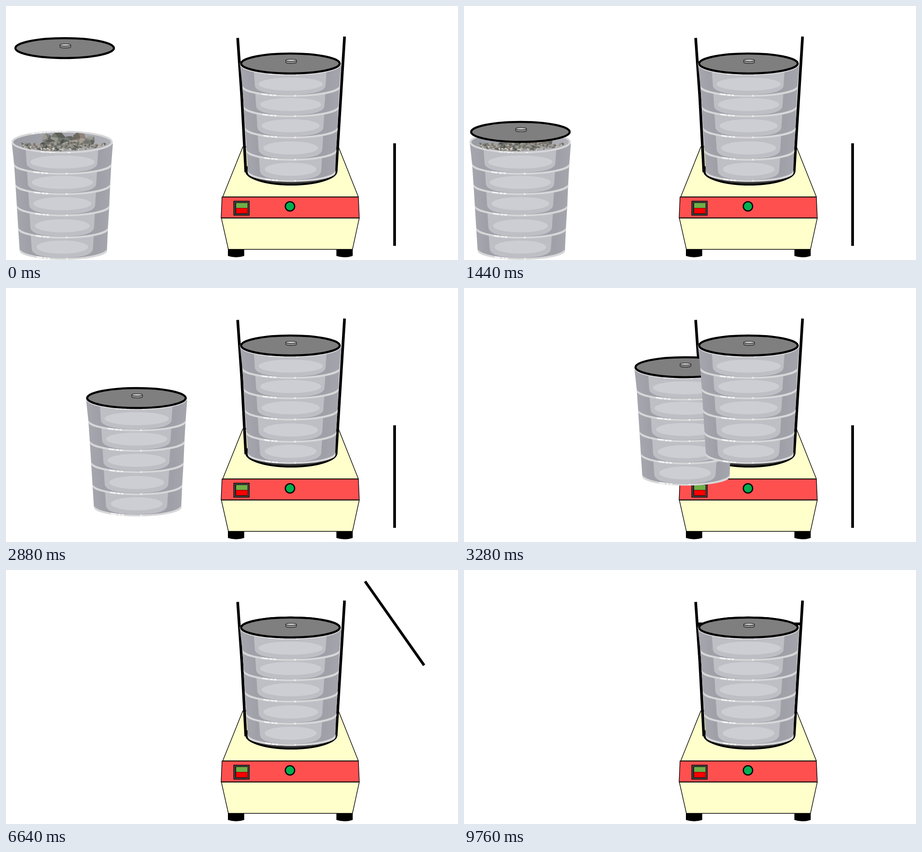
Write an HTML page that moves like this. It is 998 px wide and 561 px high and loops after 9800 ms.

```html
<!DOCTYPE html>
<html lang="en">
<head>
<meta charset="utf-8">
<title>Sieve shaker</title>
<style>
  html, body { margin: 0; width: 100%; height: 100%; overflow: hidden; background: #fff; }
  svg { display: block; width: 998px; height: 561px; }
</style>
</head>
<body>
<svg viewBox="0 0 998 561" xmlns="http://www.w3.org/2000/svg">
  <defs>
    <linearGradient id="steel">
      <stop offset="0" stop-color="#a6a7ae"/>
      <stop offset=".12" stop-color="#9fa0a8"/>
      <stop offset=".88" stop-color="#9fa0a8"/>
      <stop offset="1" stop-color="#a5a6ad"/>
    </linearGradient>
    <linearGradient id="hollow">
      <stop offset="0" stop-color="#9a9ca3"/>
      <stop offset="1" stop-color="#b0b1b7"/>
    </linearGradient>
    <clipPath id="opening"><ellipse cx="628" cy="128.5" rx="108" ry="21.5"/></clipPath>
    <g id="stack"></g>
    <g id="lid">
      <ellipse rx="108.800" ry="22" fill="#7f7f7f" stroke="#000" stroke-width="4.500"/>
      <g stroke="#1c1c1c" stroke-width="1.100">
        <path d="M-10.500-7V-2.500A12 2.400 0 0 0 13.500-2.500V-7" fill="#8c8c8c"/>
        <ellipse cx="1.500" cy="-7" rx="12" ry="2.500" fill="#c4c4c4"/>
      </g>
    </g>
  </defs>

  <g stroke="#000" stroke-width="1.400">
    <path d="M490 537h36v15q-18 6-36 0zM729.500 537h36v15q-18 6-36 0z" stroke="none"/>
    <path d="M523 311H734L778 421.500H478.500Z" fill="#ffc"/>
    <path d="M477 422H778L780 468H475Z" fill="#ff5050"/>
    <path d="M475.500 468.500H780L765 537.500H491Z" fill="#ffc"/>
    <rect x="503" y="431" width="34" height="31" fill="#484848"/>
    <rect x="506.500" y="434" width="27" height="25" fill="#000" stroke="none"/>
    <rect x="508" y="435" width="25" height="11" fill="#70ad47" stroke="none"/>
    <rect x="508" y="446.500" width="25" height="11.500" fill="#f00" stroke="none"/>
    <circle cx="627" cy="442.500" r="10.300" fill="#00b050" stroke-width="2.600"/>
    <ellipse cx="630" cy="364" rx="100" ry="30.500" fill="#3a3a3a" stroke-width="4"/>
  </g>
  <path d="M511.500 70.500L520.500 200L529.500 367M747.500 67.500L729 364" fill="none" stroke="#000" stroke-width="6"/>

  <path id="rod" d="M0-113.300V113.300" stroke="#000" stroke-width="6"/>
  <g id="load">
    <use href="#stack"/>
    <g id="stones" clip-path="url(#opening)"></g>
  </g>
  <use id="cover" href="#lid"/>
  <use href="#stack"/>
  <use href="#lid" x="628" y="127"/>
</svg>
<script>
const $ = id => document.getElementById(id);
const LOOP = 9800, STEP = 40;

// Ring borders from top to bottom: [left, right, y]
const rims = [[517, 740, 132], [522, 736.5, 178], [525, 734, 223], [528, 732, 270], [531, 729, 319], [534, 727, 366]];

function ring(i) {
  const [l0, r0, y0] = rims[i], [l, r, y] = rims[i + 1];
  const rx = (r - l) / 2;
  const arc = `${l} ${y}A${rx} 21 0 0 0 ${r} ${y - 1}`;
  const a = 546.5 + i * 2.8, b = 708.5 - i * 2.4;
  return `<path d="M${l0} ${y0}L${arc}L${r0} ${y0}Z" fill="url(#steel)"/>
    <path d="M${a} ${y0}L${a + 3} ${y - 2}C${a + 4} ${y + 12} 585 ${y + 18} 628 ${y + 18}
      S${b - 4} ${y + 12} ${b - 3} ${y - 2}L${b} ${y0}Z" fill="#bebfc5"/>
    <ellipse cx="628.500" cy="${y - 5.5}" rx="${71 - i * 3.5}" ry="14.500" fill="#cdced3"/>
    <path d="M${l - 0.5} ${y - 3}A${rx} 22 0 0 0 ${r + 0.5} ${y - 4}V${y + 2}A${rx} 20 0 0 1 ${l} ${y + 3}Z"
      fill="#d7d7d9"/>
    <path d="M${arc}" fill="none" stroke="#f5f5f6" stroke-width="3.200" pathLength="100"
      stroke-dasharray="0 21 6 1.5 3 1 2.5 18 1.5 100"/>`;
}

$('stack').innerHTML = [4, 3, 2, 1, 0].map(ring).join('') +
  `<ellipse cx="628" cy="128.500" rx="109.800" ry="23" fill="url(#hollow)" stroke="#d7d7d9" stroke-width="4"/>
   <path d="M581 150A109.800 23 0 0 0 612 151.300M640 151.400h6M560 110.500Q590 105.500 640 105.500"
     fill="none" stroke="#f3f3f4" stroke-width="2.500" stroke-dasharray="9 2 4 2"/>`;

let seed = 11;
const rnd = () => (seed = seed * 16807 % 2147483647) / 2147483647;
const pick = list => list[Math.floor(rnd() * list.length)];
const greys = ['#7d7f7a', '#8a8880', '#6d706c', '#94918a', '#5f625f', '#a09a92', '#847a73'];

function stone(x, y, r, color = pick(greys)) {
  const n = 7, turn = rnd() * 6;
  const pts = Array.from({ length: n }, (_, k) => {
    const q = turn + k * 2 * Math.PI / n, d = r * (0.8 + rnd() * 0.35);
    return [x + d * Math.cos(q), y + d * 0.85 * Math.sin(q)].map(v => v.toFixed(1));
  });
  const mid = [x + r * 0.15, y - r * 0.1];
  const face = (list, fill, o) => `<polygon points="${list.join(' ')}" fill="${fill}" opacity="${o}"/>`;
  return face(pts, color, 1) + face([pts[0], pts[1], pts[2], mid], '#c9c5bb', 0.4) +
    face([pts[3], pts[4], pts[5], mid], '#33382f', 0.35);
}

function heap() {
  const front = x => 125 + 22 * Math.sqrt(1 - ((x - 628) / 112) ** 2);
  let out = '';
  const big = [[594, 121, 13], [617, 121, 18, '#73776f'], [645, 126, 15], [666, 121, 17, '#8f827b'],
    [690, 125, 12], [603, 133, 13], [631, 134, 14], [655, 135, 13], [680, 134, 13]];
  for (const s of big) out += stone(...s);
  for (let i = 0; i < 85; i++) {
    const x = 536 + rnd() * 186, near = 1 - Math.abs(x - 628) / 100;
    out += stone(x, front(x) - rnd() * (5 + 14 * near), 2.5 + rnd() * (2 + 4.5 * near));
  }
  for (let i = 0; i < 50; i++) {
    const x = 534 + rnd() * 188;
    out += stone(x, front(x) - rnd() * 4, 1.2 + rnd() * 1.3, pick(['#e8e4dc', '#cbc5bb', '#8b857c']));
  }
  return out;
}
$('stones').innerHTML = heap();

const clamp = u => Math.min(1, Math.max(0, u));
const part = (t, start, span) => clamp((t - start) / span);
const ease = u => u < 0.5 ? (2 * u) ** 2.4 / 2 : 1 - (2 - 2 * u) ** 2.4 / 2;
const mix = (a, b, u) => a + (b - a) * u;
const place = (id, x, y, turn = 0) =>
  $(id).setAttribute('transform', `translate(${x.toFixed(2)} ${y.toFixed(2)}) rotate(${turn.toFixed(2)})`);

function draw(t) {
  const drop = ease(part(t, -30, 1980));
  const carry = ease(part(t, 2000, 2105));
  const lift = ease(part(t, 3904, 1970));
  const turn = part(t, 5875, 1960);
  const slide = ease(part(t, 7820, 1980));
  const dx = 504 * carry, dy = -172 * carry;
  place('load', dx - 504, dy + 172);
  place('cover', mix(129.5, 124, drop) + dx, mix(93, 299, drop) + dy);
  place('rod', mix(858, 630.5, slide), mix(416.5, 117, lift) + 2 * turn, -90 * turn);
  $('stones').style.display = t < 1960 ? '' : 'none';
}

function tick() {
  draw(Math.floor(performance.now() % LOOP / STEP) * STEP);
  requestAnimationFrame(tick);
}
tick();
</script>
</body>
</html>
```
